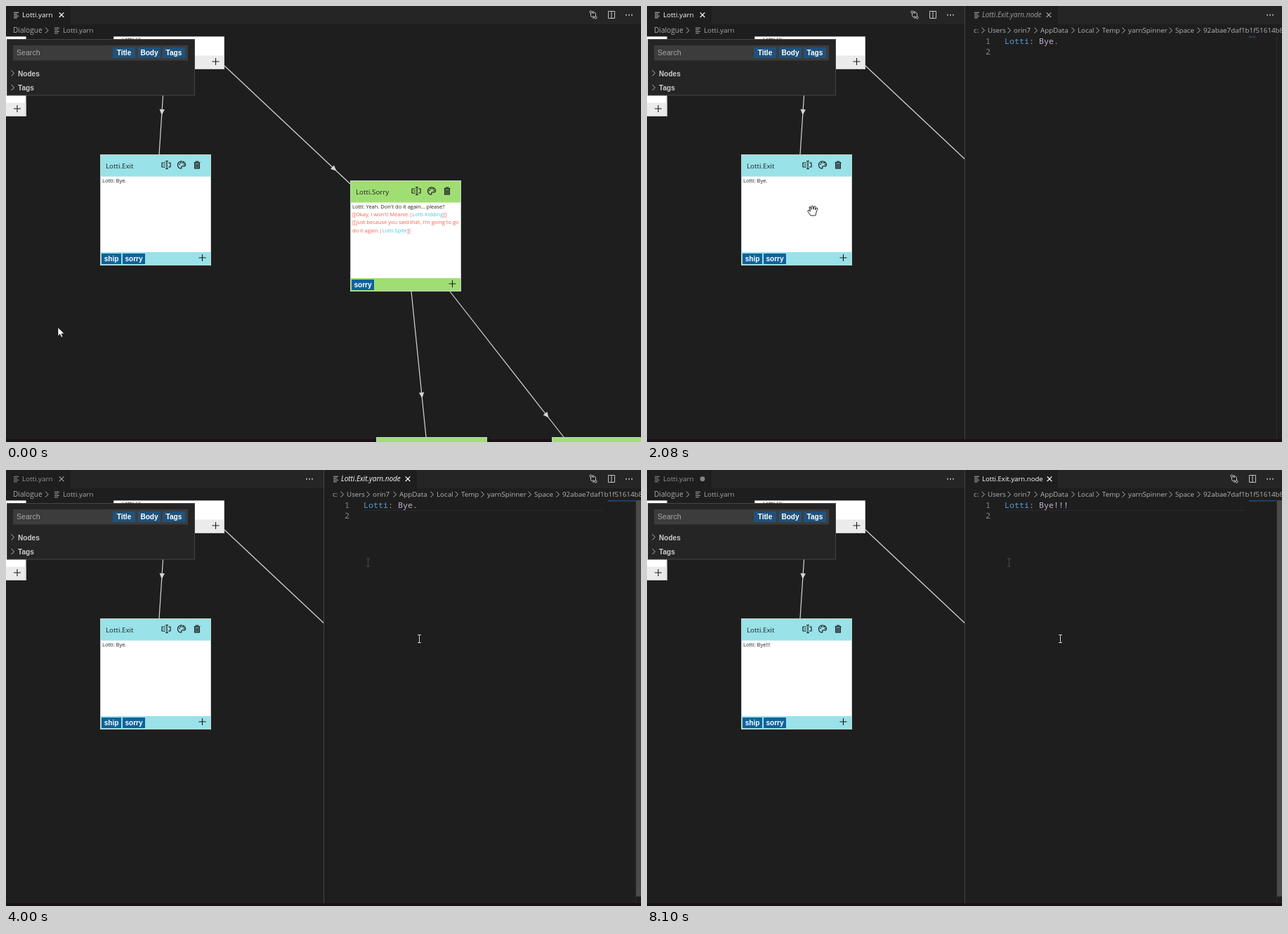
Write an HTML page that moves like this. It is 904 px wide and 620 px high and loops after 8180 ms.

```html
<!DOCTYPE html>
<html lang="en">
<head>
<meta charset="utf-8">
<title>Dialogue editor</title>
<style>
  html, body { margin: 0; width: 100%; height: 100%; overflow: hidden; background: #1e1e1e; }
  svg { display: block; }
  text { font-family: "Open Sans", "Noto Sans", sans-serif; font-size: 9.8px; white-space: pre; }
  .b { font: bold 10.1px "Liberation Sans", Arial, sans-serif; }
  .s { font: 10.6px "Liberation Sans", Arial, sans-serif; }
  .n { font-size: 7.5px; }
  .m { font: 11.67px "Noto Sans Mono", "DejaVu Sans Mono", monospace; }
</style>
</head>
<body>
<svg id="stage" width="904" height="620" viewBox="0 0 904 620"></svg>
<script>
const LOOP = 8180, SPLIT = 2080, FOCUS = 3460, EDIT = 4690, SAVE = 6330, SYNC = 6400;
const NAME = 'Lotti';

const rect = (x, y, w, h, fill, more = '') =>
  `<rect x="${x}" y="${y}" width="${w}" height="${h}" fill="${fill}" ${more}/>`;
const text = (x, y, s, fill, more = '') => `<text x="${x}" y="${y}" fill="${fill}" ${more}>${s}</text>`;
const line = (d, color, w = 1, more = '') =>
  `<path d="${d}" fill="none" stroke="${color}" stroke-width="${w}" ${more}/>`;
const group = (x, y, s, more = '') => `<g transform="translate(${x} ${y})" ${more}>${s}</g>`;
const frame = (x, y, w, h, color) => rect(x + .5, y + .5, w - 1, h - 1, 'none', `stroke="${color}"`);

const plus = (x, y) => line(`M${x - 5} ${y}h10M${x} ${y - 5}v10`, '#1a1a1a', 1.1);
const cross = (x, y, c) => line(`M${x - 3.3} ${y - 3.3}l6.6 6.6m0 -6.6l-6.6 6.6`, c, 1.2);
const chevron = (x, y) => line(`M${x - 2} ${y - 4}l4 4l-4 4`, '#b8b8b8', 1);
const fileIcon = (x, y, c) => line(`M${x} ${y - 3.5}h7M${x} ${y - 1}h5M${x} ${y + 1.5}h7M${x} ${y + 4}h5`, c, 1.1);
const dots = x => [-4, 0, 4].map(d => `<circle cx="${x + d}" cy="12.7" r="1" fill="#c5c5c5"/>`).join('');

const tools = line('M832.5 10v3.5q0 2.5 3 2.5h2m-2 -2l2 2l-2 2M839.5 15v-3.5q0 -2.5 -3 -2.5h-2m2 -2l-2 2l2 2', '#c5c5c5') +
  '<g fill="none" stroke="#c5c5c5"><circle cx="832.5" cy="8.5" r="1.6"/><circle cx="839.5" cy="16.5" r="1.6"/>' +
  '<path d="M857.5 7.5h9v10h-9zM862 7.5v10"/></g>';

const renameIcon = line('M-1 -3h-5v6h5M3 -3h3v6h-3M-1 -5.5h4M-1 5.5h4M1 -5.5v11M-4 0h3', '#222', 1.2);
const paletteIcon = line('M-5 2.5C-7 -2 -3 -6 1 -5C6 -4 7 2 3 2C0 1 -1 2 0 4C0 6 -4 5 -5 2.5z', '#222', 1.2) +
  [[-3, -1], [-1, -3], [2, -3], [3.5, -.5]].map(p => `<circle cx="${p[0]}" cy="${p[1]}" r=".9" fill="#222"/>`).join('');
const trashIcon = rect(-3.4, -3, 6.8, 8, '#22222266') +
  line('M-4.5 -3.5h9M-1.5 -3.5v-1.5h3v1.5M-3.4 -3.5v8.4h6.8v-8.4M-1.2 -1.5v5M1.2 -1.5v5', '#222', 1.2);

function tag(x, y, label, w, fill = '#0e639c') {
  return rect(x, y, w, 15, fill) + text(x + w / 2, y + 11.2, label, '#fff', 'class="b" text-anchor="middle"');
}

const EDGE = '#c4cccc';
function node(x, y, color, title, body, tags) {
  return `<svg x="${x}" y="${y}" width="158" height="158">` + rect(0, 0, 158, 158, color) +
    rect(0, 31.5, 158, 107.5, '#fff') + text(8, 19.5, title, '#222') +
    group(94, 15, renameIcon) + group(116, 15, paletteIcon) + group(138, 15, trashIcon) +
    body + tags + plus(145.5, 147) + frame(0, 0, 158, 158, EDGE) + '</svg>';
}

// A node whose lower part only is in view.
function nodeEnd(x, bottom, w) {
  return rect(x, 20, w, bottom - 20, '#fff') + rect(x, bottom - 19.5, w, 19.5, '#ebebeb') +
    frame(x, 20, w, bottom - 20, EDGE) + plus(x + w - 12.5, bottom - 11);
}

// Line between two points with an arrowhead at fraction k.
function link(x1, y1, x2, y2, k) {
  const turn = Math.atan2(y2 - y1, x2 - x1) * 180 / Math.PI;
  return line(`M${x1} ${y1}L${x2} ${y2}`, '#d6d6d6', 1.2) +
    `<path d="M4 0L-4 -3.7V3.7z" fill="#d6d6d6" transform="translate(${x1 + (x2 - x1) * k} ${y1 + (y2 - y1) * k}) rotate(${turn})"/>`;
}

const red = '#f8604a', cyan = '#40c8dc';
const jump = (s, to) => `${s}|<tspan fill="${cyan}">${to}</tspan>]]`;
const row = (i, s, fill, more = '') => text(3, 40.2 + i * 11.1, s, fill, 'class="n" ' + more);
const strip = (x, w) => rect(x, 616, w, 4, '#181115');

const graph = strip(0, 904) +
  link(225, 105, 218, 211, .435) + link(311, 85, 490, 253, .874) +
  link(577, 406, 598, 613, .713) + link(632, 406, 794, 613, .852) +
  nodeEnd(-130, 157, 158.5) + nodeEnd(153, 90, 158) +
  text(165, 49.5, NAME + ': Hi.', '#222', 'class="n"') +
  node(134, 211, '#98e2e8', NAME + '.Exit', row(0, '', '#222', 'id="bye"'),
    tag(2, 141, 'ship', 28) + tag(32, 141, 'sorry', 32)) +
  node(490, 248, '#a0de74', NAME + '.Sorry',
    row(0, NAME + ": Yeah. Don't do it again... please?", '#222') +
    row(1, jump("[[Okay, I won't! Meanie.", NAME + '.Kidding'), red) +
    row(2, "[[Just because you said that, I'm going to go", red) +
    row(3, jump('do it again.', NAME + '.Spite'), red), tag(2, 141, 'sorry', 32)) +
  [527, 777].map(x => rect(x, 613, 158, 7, '#a0de74') + frame(x, 613, 158, 158, EDGE)).join('');

const finder = rect(1.5, 47.5, 267, 79.5, '#252526', 'stroke="#454545"') +
  rect(10, 56, 249, 21.5, '#3c3c3c') + text(15, 70.3, 'Search', '#a6a6a6', 'class="s"') +
  tag(152, 59, 'Title', 32, '#21527a') + tag(188, 59, 'Body', 32, '#21527a') + tag(223, 59, 'Tags', 32, '#21527a') +
  ['Nodes', 'Tags'].map((s, i) => chevron(9.5, 95.5 + i * 20.5) +
    text(17, 99.5 + i * 20.5, s, '#ccc', 'class="b"')).join('');

const leftBar = rect(0, 0, 904, 43.4, '#1e1e1e') + rect(92, 0, 812, 26, '#252526') +
  '<g id="leftTab"></g>' + text(10, 38.2, 'Dialogue', '#a9a9a9', 'style="font-size:10.1px"') + chevron(58, 34.7) +
  fileIcon(69, 34.7, '#a9a9a9') + text(81, 38.2, NAME + '.yarn', '#a9a9a9');

const crumbs = [[465, 'c:'], [485, 'Users'], [522, 'orin7'], [560, 'AppData'], [613, 'Local'],
  [648, 'Temp'], [685, 'yarnSpinner'], [752, 'Space'], [792, '92abae7daf1b1f51614b8']];
const pane = rect(452, 0, 452, 620, '#1e1e1e') + rect(585, 0, 319, 26, '#252526') + strip(452, 452) +
  rect(452, 0, 1, 616, '#444') + '<g id="rightTab"></g>' + dots(887) +
  crumbs.map(([x, s], i) => text(x, 38.2, s, '#b4b4b4') + (i ? chevron(x - 6.5, 34.7) : '')).join('') +
  text(482, 54, '1', '#858585', 'class="m"') + text(482, 69, '2', '#858585', 'class="m"') +
  rect(896, 43, 1, 573, '#2a2a2a') + rect(857, 43.5, 5, 1, '#3a648a') + rect(863, 43.5, 3, 1, '#6d6275') +
  rect(897, 43, 7, 563.5, '#4a4a4a', 'id="scroll"') +
  '<g id="current">' + rect(509, 57, 342, 1, '#2a2a2a') + rect(857, 43, 39, 1.6, '#1f4874') + '</g>' +
  text(509, 54, '', '#569cd6', 'id="code" class="m"') + rect(0, 43, 1.2, 15.5, '#d8d8d8', 'id="caret"');

const beam = c => line('M-2.5 -5.5h5M0 -5.5v11M-2.5 5.5h5', c);
const cursors = {
  arrow: '<path d="M0 0V12.4L2.9 9.7L4.9 14.2L6.9 13.3L5 9H9z" fill="#fff" stroke="#000" stroke-width=".6"/>',
  hand: '<path d="M-3 7L-6.8 1.5q-1 -2 .9 -2.2L-3.5 1L-5 -4q0 -1.8 1.5 -1.4L-2.2 -1.6L-1.8 -6.4q1 -1.4 2.1 0L.7 -1.8L2 -5.9q1.5 -1 2.1 .4L3.3 -1L5 -3.8q1.7 -.4 1.7 1L4.8 3L3.8 7z" fill="#fff" stroke="#000" stroke-width=".85" stroke-linejoin="round"/>',
  beam: beam('#d0d0d0')
};

document.getElementById('stage').innerHTML = rect(0, 0, 904, 620, '#1e1e1e') + graph + finder + leftBar +
  `<g id="leftTools">${tools}</g><g id="leftDots">${dots(887)}</g>` +
  `<g id="pane">${pane}<g id="rightTools">${tools}</g>${group(515.5, 131.5, beam('#4a4a4a'), 'id="trail"')}</g>` +
  '<g id="mouse"></g>';

const el = id => document.getElementById(id);
const show = (id, on) => el(id).setAttribute('display', on ? 'inline' : 'none');
const move = (id, x, y) => el(id).setAttribute('transform', `translate(${x} ${y})`);
const cache = {};
function fill(id, html) {
  if (cache[id] !== html) el(id).innerHTML = cache[id] = html;
}

// Start, end, step count, destination of each pointer stroke.
const strokes = [[690, 1380, 10, 236, 291], [2160, 2540, 6, 515.5, 131.5], [2620, 2930, 5, 579, 66.5],
  [3000, 3230, 4, 596.5, 50], [3537, 4000, 7, 588.5, 240]];
function pointer(t) {
  let x = 74, y = 457;
  for (const [from, to, n, tx, ty] of strokes) {
    if (t < from) break;
    const step = (to - from) / (n - 1);
    const k = Math.min(1, (Math.floor((t - from) / step + 1e-6) + 1) / n);
    const e = k * k * (3 - 2 * k);
    x += (tx - x) * e;
    y += (ty - y) * e;
  }
  return [x, y];
}

const keys = [[EDIT, 'Bye'], [5240, 'Bye!'], [5390, 'Bye!!'], [5640, 'Bye!!!']];
const blinks = [FOCUS, 3960, 4460, 6100, 6630, 7110, 7570, 8100];

function draw(t) {
  const split = t >= SPLIT, focus = t >= FOCUS, edited = t >= EDIT;
  const [x, y] = pointer(t);
  const over = x > 134 && x < 291 && y > 211 && y < 368;
  const inEditor = split && x > 453;

  const leftColor = focus ? '#969696' : '#fff';
  fill('leftTab', fileIcon(11, 12.7, focus ? '#969696' : '#ccc') + text(23, 16.4, NAME + '.yarn', leftColor) +
    (t >= SYNC ? '<circle cx="79" cy="12.7" r="3.4" fill="#858585"/>' : cross(79, 12.7, leftColor)));
  show('leftTools', !focus);
  move('leftTools', split ? -455 : 0, 0);
  move('leftDots', split ? -455 : 0, 0);

  show('pane', split);
  const rightColor = focus ? '#fff' : '#a0a0a0';
  const style = edited ? 'style="font-size:9.6px"' : 'font-style="italic" style="font-size:10px"';
  fill('rightTab', fileIcon(466, 12.7, '#bbb') + text(477, 16.4, NAME + '.Exit.yarn.node', rightColor, style) +
    (edited && t < SAVE ? '<circle cx="573" cy="12.7" r="3.4" fill="#ddd"/>' : cross(edited ? 573 : 572, 12.7, rightColor)));
  show('rightTools', focus);
  show('current', focus);
  show('scroll', inEditor);
  show('trail', t >= 2620);

  let said = 'Bye.';
  for (const [at, s] of keys) if (t >= at) said = s;
  fill('code', `${NAME}<tspan fill="#b8b8b8">: </tspan><tspan fill="#c6b0d2">${said}</tspan>`);
  fill('bye', `${NAME}: ${t >= SYNC ? 'Bye!!!' : 'Bye.'}`);
  el('caret').setAttribute('x', 509.8 + (7 + said.length) * 7);
  show('caret', blinks.filter(b => t >= b).length % 2 === 1);

  fill('mouse', cursors[inEditor ? 'beam' : over ? 'hand' : 'arrow']);
  move('mouse', x, y);
}

function tick() {
  draw(performance.now() % LOOP);
  requestAnimationFrame(tick);
}
tick();
</script>
</body>
</html>
```
